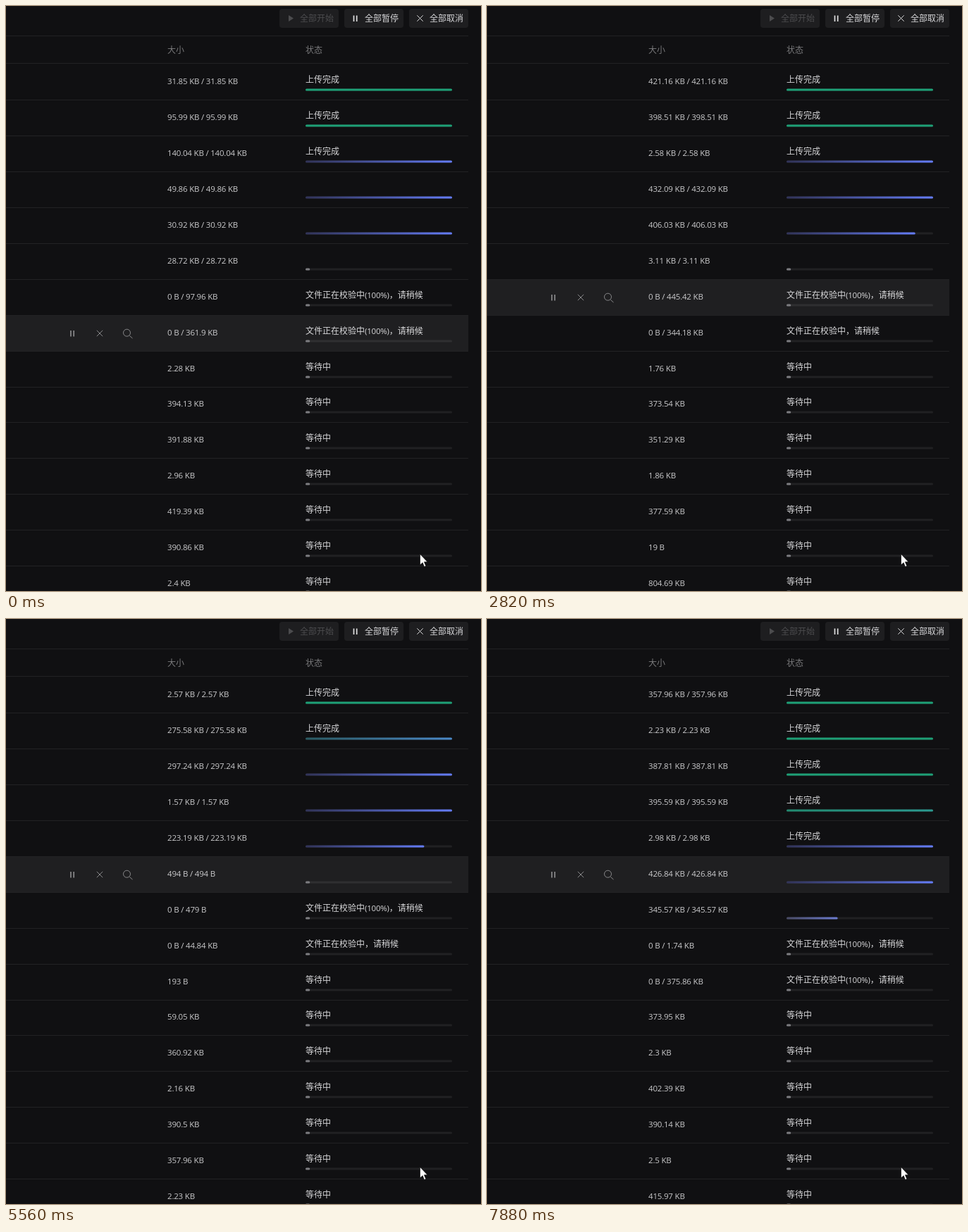
An HTML page for the animation above (8000 ms loop, 674 by 831 pixels).

```html
<!DOCTYPE html>
<html lang="zh-CN">
<head>
<meta charset="utf-8">
<style>
html, body { margin: 0; width: 100%; height: 100%; overflow: hidden; background: #101012; }
svg { display: block; }
text { font: 500 12px "Noto Sans CJK SC", "Noto Sans CJK", sans-serif; fill: #d6d6d8; }
.latin { font-family: "Open Sans", "Noto Sans", sans-serif; font-size: 11.5px; letter-spacing: -.2px; }
.size { fill: #cacacc; }
.head { fill: #78787a; }
.off { fill: #4c4c4e; }
.icon { fill: none; stroke: #8a8a8c; stroke-width: 1; }
.bright { stroke: #dededf; }
</style>
</head>
<body>
<svg width="674" height="831" viewBox="0 0 674 831">
  <g id="toolbar"></g>
  <text class="head" x="229" y="66.5">大小</text>
  <text class="head" x="425" y="66.5">状态</text>
  <path d="M0 42.5H656M0 81.5H656" stroke="#222224"/>
  <g id="rows"></g>
  <path transform="translate(587.5 778.5)" d="M0 0V15.5L3.6 12.2L6 18L8.3 17L5.9 11.2H10.5Z" fill="#fff" stroke="#000" stroke-width=".6"/>
</svg>
<script>
const LOOP = 8000, FRAMES = 61, ROWS = 15, ROW_PITCH = 50.9, BAR = 208;

const sizes = `31.85 95.99 140.04 49.86 30.92 28.72 97.96 361.9 2.28 394.13 391.88 2.96 419.39 390.86 2.4
421.16 398.51 2.58 432.09 406.03 3.11 445.42 344.18 1.76 373.54 351.29 1.86 377.59 19B 804.69 2.57
275.58 297.24 1.57 223.19 494B 479B 44.84 193B 59.05 360.92 2.16 390.5 357.96 2.23 387.81 395.59 2.98
426.84 345.57 1.74 375.86 373.95 2.3 402.39 390.14 2.5 415.97`.split(/\s+/)
  .map(s => s.endsWith('B') ? s.replace('B', ' B') : s + ' KB');

// Queue progress: how many files have passed each stage at a few frames
const progress = [
  { frame: 0, removed: 0, done: 3, upload: 6.3, verify: 8.5 },
  { frame: 6, removed: 3, done: 6, upload: 8.9, verify: 11.5 },
  { frame: 15, removed: 10, done: 14, upload: 16.9, verify: 19 },
  { frame: 27, removed: 20, done: 22, upload: 26, verify: 27.6 },
  { frame: 36, removed: 25, done: 27, upload: 31, verify: 32.6 },
  { frame: 48, removed: 35, done: 38, upload: 42.4, verify: 43.6 },
  { frame: 60, removed: 43, done: 48, upload: 50.9, verify: 52.6 }
];

// Frame at which the file in this queue place passes the stage
function reach(stage, place) {
  const count = place + 1;
  const found = progress.findIndex((p, i) => i > 0 && p[stage] >= count);
  const end = found < 0 ? progress.length - 1 : found;
  const a = progress[end - 1], b = progress[end];
  return a.frame + (b.frame - a.frame) * ((count - a[stage]) / (b[stage] - a[stage]));
}

// Files under 1 KB overtake a few larger ones
const finishKey = id => id - (sizes[id].endsWith(' B') ? 3.5 : 0);
const finishOrder = sizes.map((_, id) => id).sort((a, b) => finishKey(a) - finishKey(b));

const files = sizes.map((size, id) => {
  const place = finishOrder.indexOf(id);
  return { id, size, verify: reach('verify', id), upload: reach('upload', id),
    done: reach('done', place), removed: reach('removed', place) };
});

const GRAY = [124, 124, 128], GREEN = [29, 160, 118], DARK = [49, 51, 88], BLUE = [100, 124, 248];
const clamp = x => Math.min(1, Math.max(0, x));
const mix = (a, b, p) => a.map((v, i) => v + (b[i] - v) * p);
const rgb = c => `rgb(${c.map(Math.round)})`;

const pauseIcon = (x, y, tone = '') =>
  `<path class="icon ${tone}" style="stroke-width:1.7" d="M${x - 2} ${y - 4}v8.5m4.2 0v-8.5"/>`;
const crossIcon = (x, y, tone = '') =>
  `<path class="icon ${tone}" d="M${x - 4.2} ${y - 4.2}l8.4 8.4m0 -8.4l-8.4 8.4"/>`;
const searchIcon = (x, y) =>
  `<g class="icon"><circle cx="${x - 1}" cy="${y - .8}" r="5"/><path d="M${x + 3} ${y + 3.5}l4 3.5"/></g>`;
const eraserIcon = (x, y) =>
  `<path class="icon" d="M${x - 6.5} ${y + 1.5}l8 -7.5l5 4.8l-8 7.5h-2.2zM${x - 3} ${y - 1.8}l5 4.8M${x - 1} ${y + 6.3}h8"/>`;

function toolbarHTML() {
  const button = (x, label, icon, tone = '') =>
    `<rect x="${x}" y="4" width="84" height="27" rx="4" fill="#1e1e20"/>${icon}
     <text class="${tone}" x="${x + 29}" y="21.5">${label}</text>`;
  return button(388, '全部开始', '<path d="M401 13v9l7 -4.5z" fill="#4c4c4e"/>', 'off')
    + button(480, '全部暂停', pauseIcon(495.5, 17.5, 'bright'))
    + button(572, '全部取消', crossIcon(587.5, 17.5, 'bright'));
}

function statusText(file, frame) {
  if (frame >= file.done) return '上传完成';
  if (frame >= file.upload) return '';
  if (frame < file.verify) return '等待中';
  const percent = frame >= file.verify + .6 ? '<tspan class="latin">(100%)</tspan>' : '';
  return `文件正在校验中${percent}，请稍候`;
}

function sizeText(file, frame) {
  if (frame < file.verify) return file.size;
  return (frame < file.upload + .4 ? '0 B' : file.size) + ' / ' + file.size;
}

function barHTML(file, frame, y) {
  const age = frame - file.upload - 1;
  const grown = 1 - (1 - clamp(age / 1.4)) ** 2;
  const blue = clamp(age / .4), green = clamp((frame - file.done) / 1.5);
  const stop = (offset, color) => {
    const shade = mix(mix(GRAY, color, blue), GREEN, green);
    return `<stop offset="${offset}" stop-color="${rgb(shade)}"/>`;
  };
  return `<linearGradient id="bar${file.id}">${stop(0, DARK)}${stop(1, BLUE)}</linearGradient>
    <rect x="425" y="${y}" width="${BAR}" height="3" rx="1.5" fill="#fff" fill-opacity=".07"/>
    <rect x="425" y="${y}" width="${BAR * Math.max(.03, grown)}" height="3" rx="1.5" fill="url(#bar${file.id})"/>`;
}

// The highlight follows a file until it leaves; after a pause it lands on another
const hovered = [7, 21, 35, 48].map(id => files[id]);
function hoveredFile(frame) {
  const index = hovered.findIndex(file => frame < file.removed);
  const previous = hovered[index - 1];
  return previous && frame < previous.removed + 2.5 ? null : hovered[index];
}

function rowHTML(file, index, frame) {
  const y = Math.round(.3 + ROW_PITCH * index);
  let hover = '';
  if (file === hoveredFile(frame)) {
    const mid = y + 108;
    hover = `<rect y="${y + 83}" width="656" height="50" fill="#1f1f21"/>`
      + (frame >= file.done ? eraserIcon(133, mid) : pauseIcon(94, mid) + crossIcon(133, mid))
      + searchIcon(172.5, mid);
  }
  return `${hover}<path d="M0 ${y + 133.5}H656" stroke="#222224"/>
    <text class="latin size" x="229" y="${y + 111}">${sizeText(file, frame)}</text>
    <text x="425" y="${y + 108.5}">${statusText(file, frame)}</text>
    ${barHTML(file, frame, y + 117.5)}`;
}

const rows = document.getElementById('rows');
document.getElementById('toolbar').innerHTML = toolbarHTML();

let shown = -1;
function draw() {
  const frame = Math.floor(performance.now() % LOOP / LOOP * FRAMES);
  if (frame !== shown) {
    shown = frame;
    rows.innerHTML = files.filter(file => frame < file.removed).slice(0, ROWS)
      .map((file, index) => rowHTML(file, index, frame)).join('');
  }
  requestAnimationFrame(draw);
}
draw();
</script>
</body>
</html>
```
